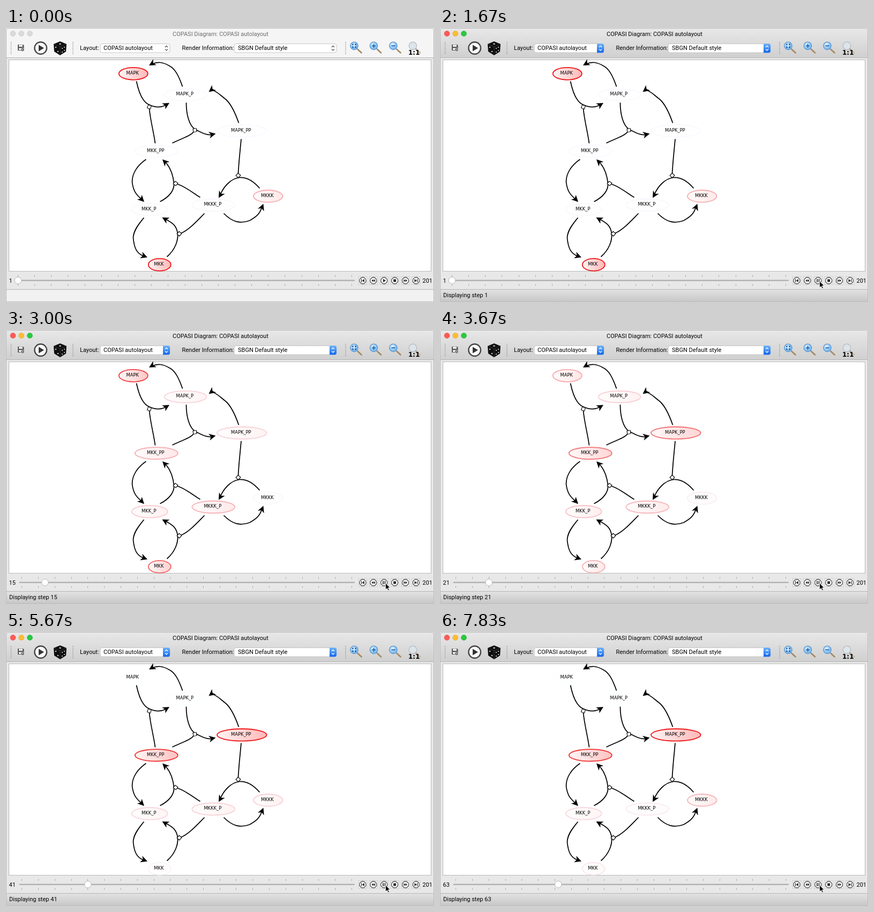
Write an HTML page that moves like this. It is 799 px wide and 512 px high and loops after 8 s.

```html
<!DOCTYPE html>
<html lang="en">
<head>
<meta charset="utf-8">
<title>Diagram animation</title>
<style>
html, body { margin: 0; width: 100%; height: 100%; overflow: hidden; background: #fff; }
svg { display: block; }
text { font: 11px Roboto, Inter, sans-serif; fill: #000; }
#nodes text { font: 8.35px "DejaVu Sans", sans-serif; text-anchor: middle; }
#nodes ellipse { stroke-width: 1.8; }
#edges path { fill: none; stroke: #000; stroke-width: 1.75; }
#edges .head { fill: #000; stroke: none; }
#edges rect { fill: #fff; stroke: #000; stroke-width: 1.1; }
.idle { display: none; }
.active .idle, .on { display: none; }
.active .on { display: inline; }
svg:not(.active) .idle { display: inline; }
svg:not(.active) #title { fill: #6c6c6c; }
</style>
</head>
<body>
<svg id="stage" width="799" height="512" viewBox="0 0 799 512">
  <defs>
    <linearGradient id="bar" x2="0" y2="1"><stop stop-color="#e8e8e8"/><stop offset="1" stop-color="#d0d0d0"/></linearGradient>
    <linearGradient id="foot" x2="0" y2="1"><stop stop-color="#e2e2e2"/><stop offset="1" stop-color="#c6c6c6"/></linearGradient>
    <linearGradient id="pink"><stop stop-color="#fff4f4"/><stop offset="1" stop-color="#ffb8b8"/></linearGradient>
    <linearGradient id="blue" x2="0" y2="1"><stop stop-color="#6cb3fa"/><stop offset="1" stop-color="#1268ee"/></linearGradient>
    <radialGradient id="lens" cx=".4" cy=".35"><stop stop-color="#eef8ff"/><stop offset="1" stop-color="#7dbdf2"/></radialGradient>
  </defs>

  <rect width="799" height="512" fill="#e8e8e8"/>
  <g class="idle">
    <rect width="799" height="55" fill="#f5f5f5"/><rect y="489" width="799" height="23" fill="#f1f1f1"/>
  </g>
  <g class="on">
    <rect width="799" height="55" fill="url(#bar)"/><rect y="489" width="799" height="23" fill="url(#foot)"/>
  </g>
  <path d="M0 55.5H799M0 488.5H799" stroke="#b4b4b4"/>
  <path d="M.5 512V4Q.5.5 4 .5H795Q798.5.5 798.5 4V511.5H0" fill="none" stroke="#bdbdbd"/>
  <rect x="5.5" y="59.5" width="788" height="395" fill="#fff" stroke="#b9b9b9"/>

  <g class="idle" fill="#dadada" stroke="#c8c8c8" stroke-width=".6">
    <circle cx="13" cy="10.5" r="5"/><circle cx="28.7" cy="10.5" r="5"/><circle cx="44.5" cy="10.5" r="5"/>
  </g>
  <g class="on" stroke-width=".6">
    <circle cx="13" cy="10.5" r="5" fill="#fc5b57" stroke="#df4744"/>
    <circle cx="28.7" cy="10.5" r="5" fill="#fdbd2e" stroke="#de9f34"/>
    <circle cx="44.5" cy="10.5" r="5" fill="#29c940" stroke="#27aa35"/>
  </g>
  <text id="title" x="311" y="14.5">COPASI Diagram: COPASI autolayout</text>

  <path d="M9.5 26V49M125 26V49M634 26V49" stroke="#999" stroke-width="1.6" stroke-dasharray="1.6 2"/>
  <g fill="#555">
    <path d="M22 31H32L33.5 32.5V42H22Z"/><path d="M24 31.5H31V35H24ZM24 37.5H32V41H24Z" fill="#f4f4f4"/>
    <circle cx="31" cy="40.5" r="3" stroke="#eee" stroke-width=".7"/><circle cx="31" cy="40.5" r="1" fill="#eee"/>
  </g>
  <circle cx="64.7" cy="37.5" r="11.3" fill="#fafafa" stroke="#454545" stroke-width="2.4"/>
  <path d="M61 31.5L71 37.5L61 43.5Z" fill="#333"/>
  <path d="M101 25L113 30L112 44L101 51L90 44L89 30Z" fill="#0d0d0d"/>
  <path d="M89 30L101 35L113 30M101 35V51" fill="none" stroke="#444" stroke-width=".8"/>
  <g fill="#ddd">
    <ellipse cx="101" cy="29.8" rx="2" ry="1.1"/><circle cx="93" cy="36" r="1.2"/><circle cx="97" cy="44" r="1.2"/>
    <circle cx="105" cy="38" r="1.1"/><circle cx="109" cy="36" r="1.1"/><circle cx="105" cy="45" r="1.1"/><circle cx="109" cy="42" r="1.1"/>
  </g>

  <text x="138" y="41.4">Layout:</text>
  <text x="328.5" y="41.4">Render Information:</text>
  <g id="combos"></g>
  <text x="182" y="41.4">COPASI autolayout</text>
  <text x="433" y="41.4">SBGN Default style</text>
  <g id="zooms"></g>
  <text x="751" y="49.5" style="font:bold 12px 'DejaVu Sans',sans-serif">1:1</text>

  <g id="edges" transform="translate(.5 .5)"></g>
  <g id="nodes" transform="translate(.3 .3)"></g>

  <text id="step" x="5.5" y="476"></text>
  <path id="groove" stroke="#b3b3b3" stroke-width="2.4" stroke-linecap="round"/>
  <path id="ticks" stroke="#a9a9a9"/>
  <circle id="knob" cy="471.7" r="6.3" fill="#fff" stroke="#b2b2b2" stroke-width=".9"/>
  <g id="buttons"></g>
  <text x="777.5" y="476">201</text>
  <text id="status" x="6" y="503.3"></text>
  <path id="cursor" d="M0 0V12.3L2.9 9.6L5 14L7 13.1L5 8.8H8.7Z" fill="#000" stroke="#fff" stroke-width=".9"/>
</svg>
<script>
const $ = id => document.getElementById(id);
const add = (id, markup) => $(id).insertAdjacentHTML('beforeend', markup);

// left edge and width of each drop-down
for (const [x, w] of [[176, 130], [426, 191]]) {
  const r = x + w;
  const chevrons = `M${r - 9} 36l2.5-2.6 2.5 2.6M${r - 9} 39.4l2.5 2.6 2.5-2.6`;
  add('combos', `<rect x="${x}" y="29.5" width="${w}" height="16.5" rx="3.5" fill="#fff" stroke="#c2c2c2" stroke-width=".9"/>
    <path class="idle" d="${chevrons}" fill="none" stroke="#444" stroke-width="1.1"/>
    <g class="on"><path d="M${r - 13} 29.2h9.5q3.5 0 3.5 3.5v10q0 3.5-3.5 3.5h-9.5z" fill="url(#blue)"/>
    <path d="${chevrons}" fill="none" stroke="#fff" stroke-width="1.3"/></g>`);
}

const zoomSigns = ['M-3-1v-2h2M1-3h2v2M3 1v2h-2M-1 3h-2v-2', 'M-3.5 0h7M0-3.5v7', 'M-3.5 0h7', ''];
zoomSigns.forEach((sign, i) => add('zooms', `<g transform="translate(${[650, 686.5, 723, 759.5][i]} 33.3)">
  <path d="M5 5l2.5 2.5" stroke="#888" stroke-width="2"/>
  <path d="M7.5 7.5l6 5.5" stroke="${i < 3 ? '#a58a62' : '#c9b596'}" stroke-width="2.8" stroke-linecap="round"/>
  <circle r="7.2" fill="${i < 3 ? 'url(#lens)' : '#dde5ea'}" stroke="${i < 3 ? '#5c96d0' : '#b4bcc4'}" stroke-width="1.3"/>
  <path d="${sign}" fill="none" stroke="#1b5fa8" stroke-width="1.8"/></g>`));

const icons = ['M-3-3h1.2v6h-1.2zM3-3v6l-4.5-3z', 'M0-2.7v5.4l-3.5-2.7zM3.2-2.7v5.4l-3.2-2.7z', 'M-1.8-3.2v6.4l5-3.2z',
  'M-2.5-2.5h5v5h-5z', 'M0-2.7v5.4l3.5-2.7zM-3.2-2.7v5.4l3.2-2.7z', 'M3-3h-1.2v6h1.2zM-3-3v6l4.5-3z'];
icons.forEach((d, i) => add('buttons', `<g transform="translate(${666 + i * 19.9} 472)">
  <rect x="-7.5" y="-7.5" width="15" height="15" fill="#f4f4f4" stroke="#c4c4c4" stroke-width=".8"/>
  <circle r="6" fill="#fff" stroke="#505050" stroke-width="1.3"/>
  <path${i == 2 ? ' class="idle"' : ''} d="${d}" fill="#2a2a2a"/>
  ${i == 2 ? '<path class="on" d="M-2.6-3h1.8v6h-1.8zM.8-3h1.8v6h-1.8z" fill="#2a2a2a"/>' : ''}</g>`));

// reactions: curve, arrow tip, arrow angle
const reactions = [
  ['M329 109C322 89 315 75 304 70C292 63 283 62 272 67', 266.5, 69.5, 150],
  ['M243 99C247 118 254 138 267 143C280 149 289 148 297 144', 304.5, 139.5, -31],
  ['M434 177C427 157 420 142 410 133C399 125 393 117 384 115.5', 378, 119, 142],
  ['M336 139C336 160 341 182 353 189C366 196 374 200 384 199', 391, 197, -12],
  ['M261 245C246 255 235 270 235 287C237 305 243 311 253 320', 257.5, 324.5, 45],
  ['M287 324C305 315 314 302 313 290C311 270 305 258 296 249', 291.5, 245, 225],
  ['M257 354C245 368 237 380 237 392C239 412 244 421 257 426', 263.5, 428, 20],
  ['M300 427C316 413 321 396 320 384C318 368 310 364 298 357', 291, 353.5, 209],
  ['M473 299C461 285 449 278 435 279C419 281 406 296 400 310', 396.5, 317, 120],
  ['M406 346C422 362 436 366 455 359C467 352 473 347 477 335', 480, 328, -68],
];
for (const [d, x, y, turn] of reactions)
  add('edges', `<path d="${d}"/><path class="head" d="M0 0L-12.5-6.3L-9-0L-12.5 6.3Z" transform="translate(${x} ${y}) rotate(${turn})"/>`);

// modifiers: curve, square centre, square angle
const modifiers = [
  ['M278 215C275 193 269 172 267 150', 267, 147, 18],
  ['M310 214.5C325 207 345 201 350 193', 352, 190.5, -8],
  ['M438.5 207C437 225 434 250 433 272', 433, 275, 42],
  ['M362 316C349 308 333 295 319 291', 316, 290, 38],
  ['M370 346C356 360 340 378 326 383', 323, 384, 42],
];
for (const [d, x, y, turn] of modifiers)
  add('edges', `<path d="${d}"/><rect x="-3.1" y="-3.1" width="6.2" height="6.2" transform="translate(${x} ${y}) rotate(${turn})"/>`);

// species: name, ellipse, and level at each of the key steps
const keySteps = [1, 6, 15, 21, 29, 52, 63];
const species = [
  ['MAPK', 237.5, 85, 27, 11.5, [1, 1, .8, .35, -.03, -.03, -.03]],
  ['MAPK_P', 335, 124.5, 39.5, 11, [0, .02, .16, .19, -.02, -.03, -.03]],
  ['MAPK_PP', 440, 192, 46.3, 11.3, [0, 0, .17, .6, 1, 1, 1]],
  ['MKK_PP', 280.5, 230, 40, 11.2, [0, .04, .33, .58, .82, .93, .87]],
  ['MKK_P', 268, 339, 33.5, 11.3, [.01, .08, .2, .24, .22, .08, .14]],
  ['MKK', 286.5, 442, 21, 11.5, [1, 1, .65, .32, .04, .01, .08]],
  ['MKKK', 489, 314, 27.3, 11.3, [.33, .17, .01, .05, .11, .25, .3]],
  ['MKKK_P', 387, 330.5, 40, 11.3, [.01, .2, .31, .29, .23, .11, .06]],
];
for (const [name, x, y, rx, ry] of species)
  add('nodes', `<ellipse cx="${x}" cy="${y}" rx="${rx}" ry="${ry}" fill="url(#pink)"/><text x="${x - 1.5}" y="${y + 1.6}">${name}</text>`);
const ellipses = document.querySelectorAll('#nodes ellipse');

function interpolate(xs, ys, x) {
  let i = 1;
  while (i < xs.length - 1 && x > xs[i]) i++;
  const p = Math.min(1, Math.max(0, (x - xs[i - 1]) / (xs[i] - xs[i - 1])));
  return ys[i - 1] + (ys[i] - ys[i - 1]) * p;
}

function draw(time) {
  const tick = Math.floor((time % 8000 + 4) * 6 / 1000);
  const step = Math.round(interpolate([10, 13, 18, 27, 40, 47], [1, 6, 15, 29, 52, 63], tick));
  const active = tick >= 10;
  $('stage').classList.toggle('active', active);

  species.forEach((s, i) => {
    const v = interpolate(keySteps, s[5], step);
    ellipses[i].setAttribute('stroke', `rgb(${250 - 12 * v},${248 - 226 * v},${255 - 233 * v})`);
    ellipses[i].setAttribute('fill-opacity', Math.max(0, v));
  });

  // the slider gives way to a wider step number
  const start = step == 1 ? 22.5 : step < 10 ? 24.5 : 29.7;
  const gap = (645.5 - start) / 20;
  let marks = '';
  for (let i = 0; i <= 20; i++) {
    const x = Math.floor(start + i * gap) + .5;
    marks += `M${x} 461.5v3.5M${x} 478.5v3.5`;
  }
  $('ticks').setAttribute('d', marks);
  $('groove').setAttribute('d', `M${start - 4} 471.7H650`);
  $('knob').setAttribute('cx', start + (step - 1) * gap / 10);
  $('step').textContent = step;
  $('status').textContent = active ? 'Displaying step ' + step : '';

  const left = Math.max(0, 8 - tick);
  $('cursor').setAttribute('transform', `translate(${708.5 - 6.5 * left ** 1.6} ${473 + 2 * left ** 1.5})`);
  $('cursor').style.display = tick ? '' : 'none';
}

const began = performance.now();
(function loop() {
  draw(performance.now() - began);
  requestAnimationFrame(loop);
})();
</script>
</body>
</html>
```
